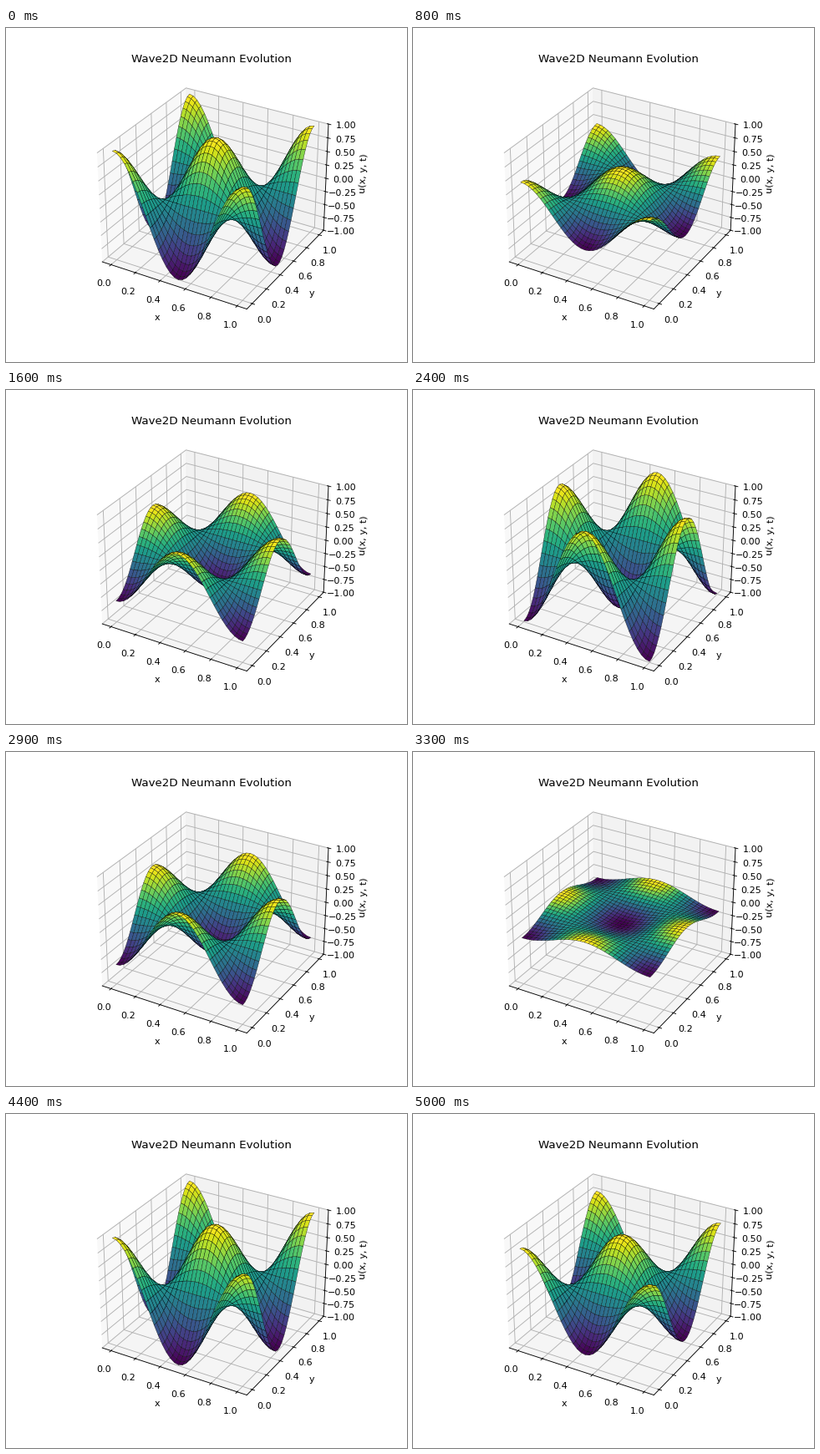
Recreate the animation shown at these times as a matplotlib script. Size 480 by 400 pixels, loop 5100 ms.

```python
import numpy as np
import matplotlib.pyplot as plt
from matplotlib.animation import FuncAnimation

FRAMES = 51
INTERVAL = 100
CELLS = 32
CFL = 0.5

# Phase advance per step of the discrete standing wave
STEP = 2 * np.arcsin(CFL * np.sqrt(2) * np.sin(np.pi / CELLS))

grid = np.linspace(0, 1, CELLS + 1)
X, Y = np.meshgrid(grid, grid, indexing="ij")
MODE = np.cos(2 * np.pi * X) * np.cos(2 * np.pi * Y)

fig = plt.figure(figsize=(6, 5), dpi=80)
ax = fig.add_subplot(projection="3d")


def draw(frame):
    ax.clear()
    ax.plot_surface(X, Y, MODE * np.cos(STEP * frame), cmap="viridis",
                    edgecolor="k", linewidth=0.3)
    ax.set_zlim(-1, 1)
    ax.set_xlabel("x")
    ax.set_ylabel("y")
    ax.set_zlabel("u(x, y, t)")
    ax.set_title("Wave2D Neumann Evolution")
    return []


anim = FuncAnimation(fig, draw, frames=FRAMES, init_func=lambda: [],
                     interval=INTERVAL, repeat=True, repeat_delay=0)
plt.show()
```
